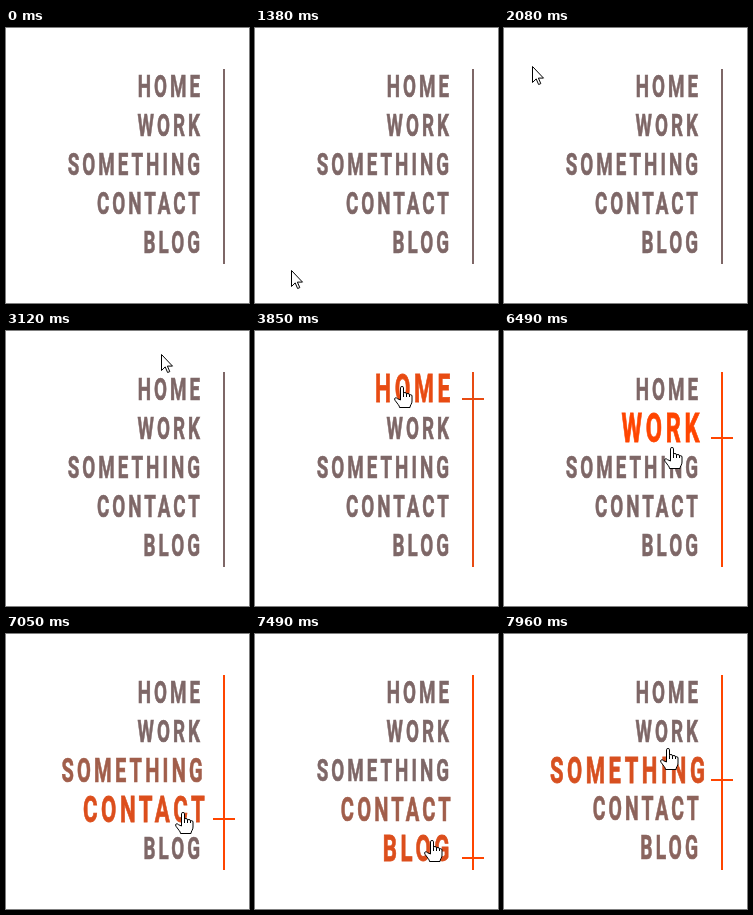
An HTML page that plays this animation: 243 px wide and 275 px high, repeating every 7.99 s.

```html
<!DOCTYPE html>
<html lang="en">
<head>
<meta charset="utf-8">
<title>Menu hover</title>
<style>
  html, body { margin: 0; width: 100%; height: 100%; overflow: hidden; background: #fff; }
  svg { display: block; width: 243px; height: 275px; }
  text {
    font: 700 32px Roboto, sans-serif;
    letter-spacing: 5.1px;
    text-anchor: middle;
    stroke-width: .7px;
  }
  .cursor { fill: #fff; stroke: #000; stroke-linejoin: round; }
</style>
</head>
<body>
<svg viewBox="0 0 243 275">
  <rect id="bar" x="217" y="41" width="2" height="195"/>
  <rect id="tick" x="207" width="22" height="2"/>
  <g id="menu"></g>
  <path id="arrow" class="cursor" d="M.5.5v16l3.7-3.6 2.4 5.6 2.2-.9-2.4-5.5h5.1z"/>
  <path id="hand" class="cursor" d="M-1.5 14V1.7Q-1.5.5 0 .5T1.5 1.7V7.5q0-1 1.5-1t1.5 1.5v.5q0-1 1.5-1t1.5 1.5v.5q0-.8 1.2-.8t1.3 1.3V15q0 2-1 3.5t-1 3H-2.5q0-1.5-1.2-2.8L-7 14.3q-1-1.6.2-2.4 1-.6 2.3.8zM1.5 7.5V11M4.5 8v3M7.5 9v2"/>
</svg>
<script>
const LOOP = 7990, FADE = 300, STEP = 5;
const TOP = 41, ROW = 39, RIGHT = 197, CONDENSE = 0.588;
const COOL = [126, 103, 103], HOT = [255, 69, 0];
const $ = id => document.getElementById(id);

// key points of the pointer: time, x, y
const path = [
  [510, 43, 274], [940, 36, 242], [1380, 36, 242], [1750, 7, 140], [2080, 28, 38],
  [2810, 155, 23], [3120, 155, 23], [3600, 155, 33], [3850, 147, 55], [4910, 153, 53],
  [5370, 112, 64], [5690, 112, 88], [6090, 160, 102], [6330, 160, 102], [6490, 168, 116],
  [7050, 177, 178], [7400, 177, 206], [7740, 177, 206], [7840, 167, 152], [7960, 164, 114]
];

function pointer(t) {
  const next = path.findIndex(k => k[0] > t);
  if (next < 0) return path.at(-1).slice(1);
  if (next === 0) return path[0].slice(1);
  const [t0, x0, y0] = path[next - 1], [t1, x1, y1] = path[next];
  const f = (t - t0) / (t1 - t0);
  return [x0 + (x1 - x0) * f, y0 + (y1 - y0) * f];
}

const items = ['HOME', 'WORK', 'SOMETHING', 'CONTACT', 'BLOG'].map((word, row) => {
  const el = document.createElementNS('http://www.w3.org/2000/svg', 'text');
  el.textContent = word;
  el.setAttribute('y', 11.4);
  $('menu').append(el);
  const width = el.getComputedTextLength() * CONDENSE;
  return { el, row, x: RIGHT - width / 2, y: 57.4 + ROW * row, left: RIGHT - width, spans: [] };
});
const list = { spans: [] };

// a hovered word is enlarged, so it keeps the pointer a little beyond its row
function hit(t, last) {
  const [x, y] = pointer(t);
  const keeps = last && Math.abs(y - TOP - ROW * (last.row + 0.5)) <= 25;
  const item = keeps ? last : items[Math.floor((y - TOP) / ROW)];
  return item && x > item.left - 14 ? item : undefined;
}

function extend(spans, t) {
  const last = spans.at(-1);
  if (last && last[1] === t) last[1] += STEP;
  else spans.push([t, t + STEP]);
}

for (let t = 0, over; t < LOOP; t += STEP) {
  over = hit(t, over);
  if (over) [over, list].forEach(o => extend(o.spans, t));
}

// the CSS "ease" curve
function ease(x) {
  if (x <= 0) return 0;
  if (x >= 1) return 1;
  let lo = 0, hi = 1, u;
  for (let i = 0; i < 20; i++) {
    u = (lo + hi) / 2;
    const v = 1 - u;
    if (0.75 * u * v * v + 0.75 * u * u * v + u ** 3 < x) lo = u; else hi = u;
  }
  return 0.3 * u * (1 - u) ** 2 + 3 * u * u * (1 - u) + u ** 3;
}

const heat = (spans, t) => Math.max(0, ...spans.map(([from, to]) =>
  ease((Math.min(t, to) - from) / FADE) * (1 - ease((t - to) / FADE))));

const color = p => `rgb(${COOL.map((c, i) => Math.round(c + (HOT[i] - c) * p))})`;

function show(el, visible) {
  el.setAttribute('visibility', visible ? 'visible' : 'hidden');
}

function draw(t) {
  for (const { el, x, y, spans } of items) {
    const p = heat(spans, t), s = 1 + 0.25 * p;
    el.setAttribute('transform', `translate(${x - 6 * p} ${y}) scale(${s * CONDENSE} ${s})`);
    el.setAttribute('fill', color(p));
    el.setAttribute('stroke', color(p));
  }

  const over = items.find(({ spans }) => spans.some(([from, to]) => t >= from && t < to));
  const lineColor = color(heat(list.spans, t));
  $('bar').setAttribute('fill', lineColor);
  $('tick').setAttribute('fill', lineColor);
  if (over) $('tick').setAttribute('y', 67 + ROW * over.row);
  show($('tick'), over);
  show($('hand'), over);
  show($('arrow'), !over && t >= path[0][0]);

  const at = `translate(${pointer(t).map(Math.round)})`;
  $('arrow').setAttribute('transform', at);
  $('hand').setAttribute('transform', at);
}

const start = performance.now();
function frame() {
  draw((performance.now() - start) % LOOP);
  requestAnimationFrame(frame);
}
frame();
</script>
</body>
</html>
```
